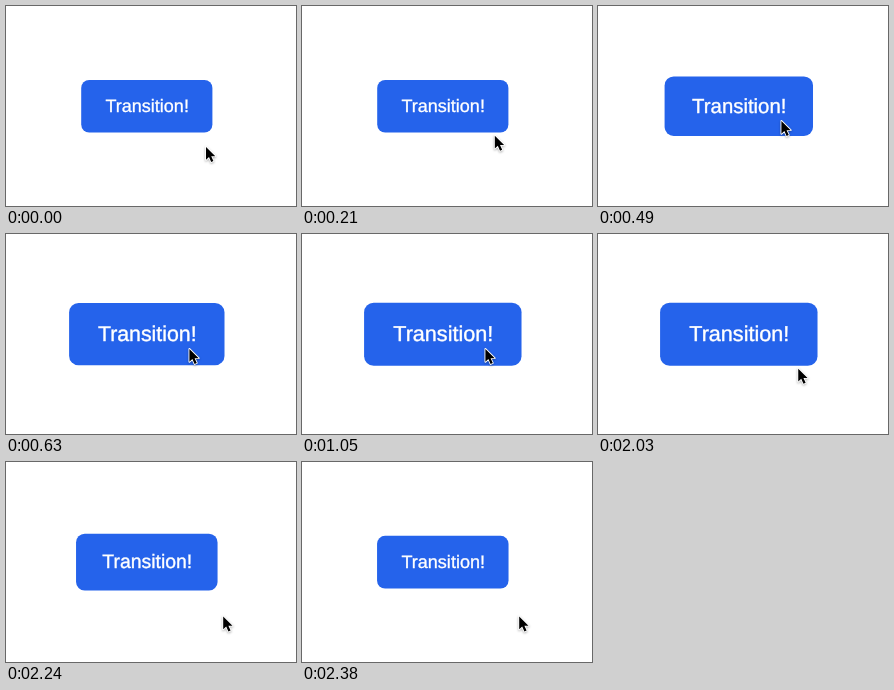
Recreate the animation shown at these times as an HTML page. Size 290 by 200 pixels, loop 2450 ms.

```html
<!DOCTYPE html>
<html lang="en">
<head>
<meta charset="utf-8">
<title>Button transition</title>
<style>
  html, body { margin: 0; width: 100%; height: 100%; overflow: hidden; background: #fff; }
  svg { display: block; width: 100vw; height: 100vh; }
  text {
    font: 18px "Liberation Sans", Arial, sans-serif;
    text-rendering: geometricPrecision;
    fill: #fff; stroke: #fff; stroke-width: .35px;
  }
  #cursor { filter: drop-shadow(0 1px 0.8px rgba(0, 0, 0, .3)); }
</style>
</head>
<body>
<svg viewBox="0 0 290 200">
  <g id="button">
    <rect x="-65.6" y="-26.3" width="131.2" height="52.6" rx="8" fill="#2563eb"/>
    <text x="0.4" y="5.7" text-anchor="middle">Transition!</text>
  </g>
  <path id="cursor" d="M0 0V12.8L3 10L5.2 15L7.4 14L5.2 9.2H9.3Z"
        fill="#000" stroke="#fff" stroke-width="1.8" stroke-linejoin="round" paint-order="stroke"/>
</svg>
<script>
const LOOP = 2450, STEP = 70;
const button = document.getElementById('button');
const cursor = document.getElementById('cursor');

const below = [200, 141], over = [183.4, 115], away = [217.2, 154.5];

const progress = (t, from, to) => Math.min(1, Math.max(0, (t - from) / (to - from)));
const slowDown = (k, power) => 1 - (1 - k) ** power;
const mix = (a, b, k) => a.map((v, i) => v + (b[i] - v) * k);

// CSS cubic-bezier timing function
function bezier(x1, y1, x2, y2) {
  const at = (a, b, s) => 3 * (1 - s) ** 2 * s * a + 3 * (1 - s) * s * s * b + s ** 3;
  return x => {
    let lo = 0, hi = 1;
    for (let i = 0; i < 24; i++) {
      const mid = (lo + hi) / 2;
      if (at(x1, x2, mid) < x) lo = mid; else hi = mid;
    }
    return at(y1, y2, lo);
  };
}
const grow = bezier(.25, .1, .25, 1);
const shrink = bezier(.4, 0, .2, 1);

function pointer(t) {
  if (t < 2 * STEP) return below;
  if (t < 1960) return mix(below, over, slowDown(progress(t, 70, 490), 1.4));
  return mix(over, away, slowDown(progress(t, 1960, 2240), 2.4));
}

function draw(time) {
  const t = Math.floor((time % LOOP) / STEP) * STEP;
  const hover = grow(progress(t, 299, 799)) - shrink(progress(t, 2121, 2421));
  const [x, y] = pointer(t);
  button.setAttribute('transform', `translate(140.8 100.2) scale(${1 + .2 * hover})`);
  cursor.setAttribute('transform', `translate(${x} ${y})`);
}

const start = performance.now();
function tick() {
  draw(performance.now() - start);
  requestAnimationFrame(tick);
}
tick();
</script>
</body>
</html>
```
